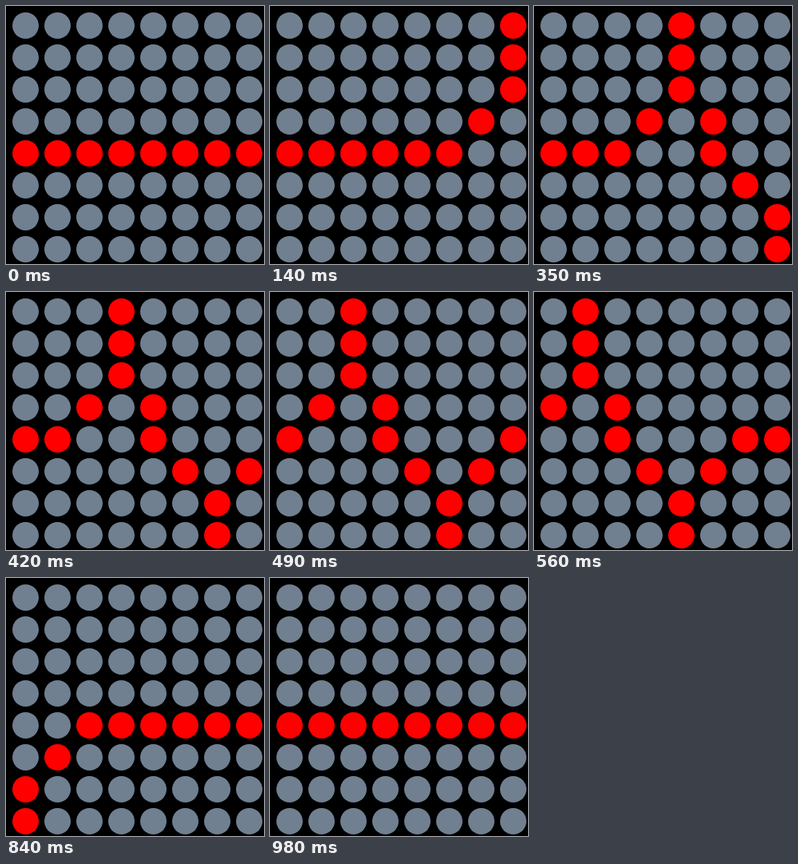
An HTML page that plays this animation: 323 by 323 pixels, repeating every 1050 ms.

```html
<!DOCTYPE html>
<html lang="en">
<head>
<meta charset="utf-8">
<title>Heartbeat dots</title>
<style>
  html, body { margin: 0; width: 100%; height: 100%; overflow: hidden; background: #000; }
  svg { display: block; }
  #strip { fill: #708090; animation: scroll 1050ms steps(15) infinite; }
  .on { fill: #f00; }
  /* 15 columns of 40px, one per step */
  @keyframes scroll { to { transform: translateX(-600px); } }
</style>
</head>
<body>
<svg width="323" height="323" viewBox="0 0 323 323">
  <!-- the inner viewport hides the column that has just left -->
  <svg x="8" y="8" width="313" height="313" overflow="hidden">
    <g id="strip"></g>
  </svg>
</svg>
<script>
  const pitch = 40, radius = 16.5, rows = 8;
  const flat = Array(8).fill([4]);
  const pulse = [[3], [0, 1, 2], [3, 4], [5], [6, 7], [5]];
  const columns = [...flat, ...pulse, ...flat];
  const strip = document.getElementById('strip');

  function addDot(col, row, lit) {
    const dot = document.createElementNS('http://www.w3.org/2000/svg', 'circle');
    dot.setAttribute('cx', col * pitch + radius);
    dot.setAttribute('cy', row * pitch + radius);
    dot.setAttribute('r', radius);
    if (lit) dot.setAttribute('class', 'on');
    strip.appendChild(dot);
  }

  columns.forEach((lit, col) => {
    for (let row = 0; row < rows; row++) addDot(col, row, lit.includes(row));
  });
</script>
</body>
</html>
```
